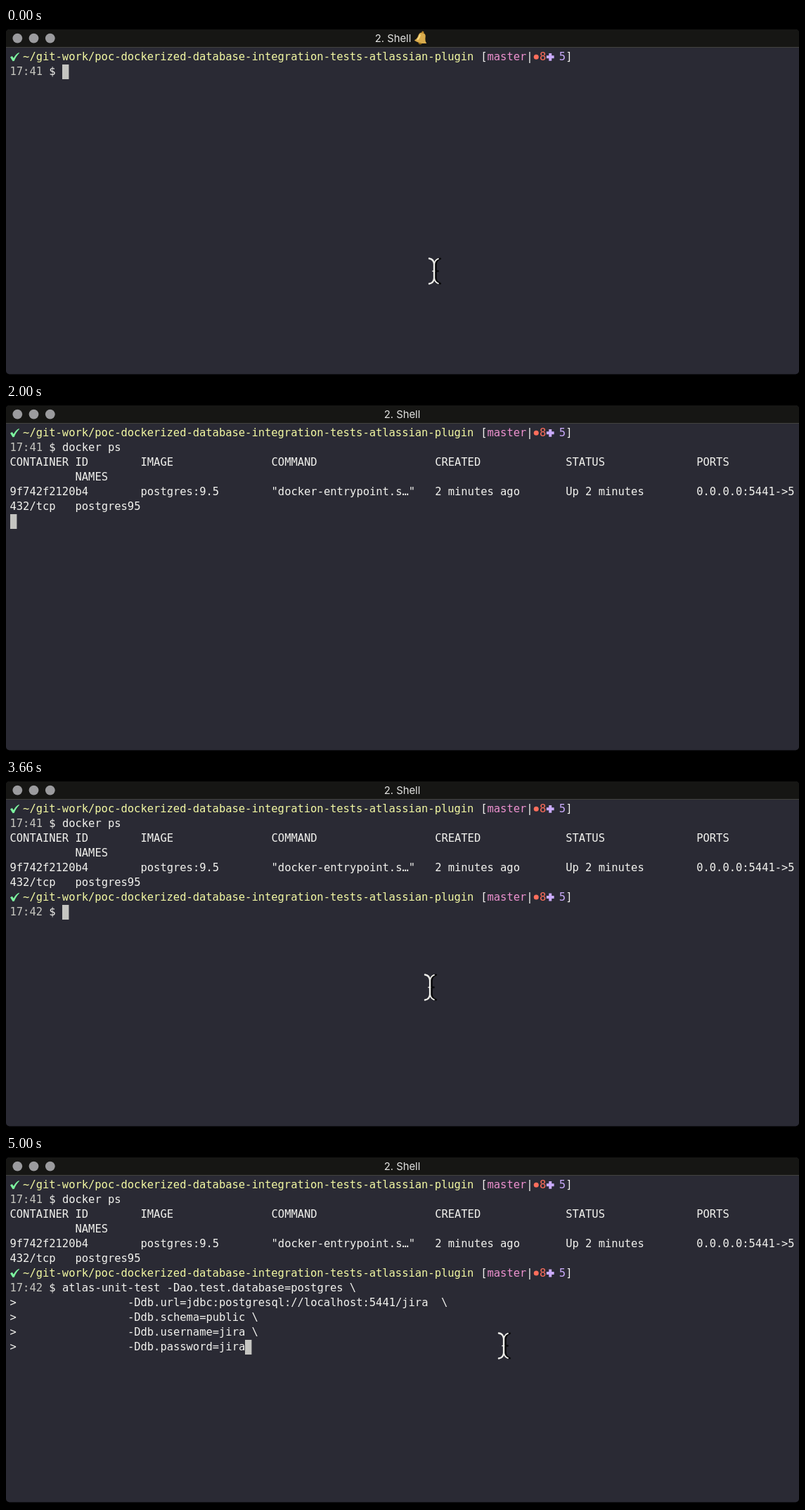
An HTML page that plays this animation: 1128 px wide and 496 px high, repeating every 8 s.

```html
<!DOCTYPE html>
<html lang="en">
<head>
<meta charset="utf-8">
<title>Shell</title>
<style>
  html, body { margin: 0; width: 100%; height: 100%; overflow: hidden; background: #000; }
  svg { display: block; width: 1128px; height: 496px; }
  text { white-space: pre; }
  #screen { font: 15.45px "DejaVu Sans Mono", monospace; fill: #f2f2ee; }
  #title { font: 14.8px Inter, sans-serif; fill: #e4e4e2; }
  .path { fill: #f3f9a3; }
  .branch { fill: #ee92d0; }
  .staged { fill: #ff6e5c; }
  .changed { fill: #c9aafa; }
  .clock { fill: #c6c6c0; }
  .ok { fill: #7df5a0; }
</style>
</head>
<body>
<svg viewBox="0 0 1128 496">
  <rect y="2" width="1128" height="491.5" rx="5" fill="#2a2a34"/>
  <path d="M0 27V7Q0 2 5 2H1123Q1128 2 1128 7V27Z" fill="#161614"/>
  <rect y="27" width="1128" height="1" fill="#43433f"/>
  <g fill="#9b9b9e">
    <circle cx="16.3" cy="14.6" r="6.9"/>
    <circle cx="39.5" cy="14.6" r="6.9"/>
    <circle cx="62.8" cy="14.6" r="6.9"/>
  </g>
  <text id="title" y="20.2" text-anchor="middle">2. Shell</text>
  <g id="bell" transform="translate(591 14) rotate(14)">
    <circle cy="7" r="2.7" fill="#8b6514"/>
    <path d="M-9 6Q-5.5 3 -5.2-2.5Q-4.8-7.4 0-7.6Q4.8-7.4 5.2-2.5Q5.5 3 9 6Q0 9 -9 6Z" fill="#d9ab4c"/>
    <path d="M-3-4Q-3 1-5 4" fill="none" stroke="#f9dc86" stroke-width="2"/>
    <circle cy="-8" r="1.6" fill="#b9852a"/>
  </g>
  <g id="screen"></g>
  <rect id="block" width="9.4" height="21" fill="#c5c5c1"/>
  <g id="mouse" fill="none" stroke-linecap="round">
    <path d="M8.3-17.8Q2.8-16.5 2-10V10Q2.8 16.5 8.3 17.8M1 0H5" stroke="#08080a" stroke-width="2.6"/>
    <path d="M-7.6-18Q-1-17-.5-10V10Q-1 17-7.6 18" stroke="#eeeeea" stroke-width="2.3"/>
    <path d="M5.5-17.6Q.6-16-.3-10V10Q.6 16 5.5 17.6M-2.5 0H0" stroke="#eeeeea" stroke-width="1.7"/>
  </g>
</svg>
<script>
const LOOP = 8000, LEFT = 5.5, CELL = 9.302, TOP = 31.2, PITCH = 20.95;
const $ = id => document.getElementById(id);
const colX = c => LEFT + c * CELL;
const rowY = r => TOP + r * PITCH;

const cell = (c, s, kind = "") =>
  `<text class="${kind}" x="${colX(c)}" y="15">${s.replace(/>/g, "&gt;")}</text>`;

const prompt =
  `<path class="ok" d="M6 10.3L8.8 8.8L10.8 11.8Q13.8 6 18.4 3.8L19 4.6Q14.5 8.7 11.7 15.8L9.5 16Z"/>` +
  cell(2, "~/git-work/poc-dockerized-database-integration-tests-atlassian-plugin", "path") +
  cell(72, "[") + cell(73, "master", "branch") + cell(79, "|") +
  `<circle class="staged" cx="754.2" cy="10" r="3.5"/>` + cell(81, "8", "staged") +
  `<path class="changed" d="M772.2 4.7h4v3.4h3.4v4h-3.4v3.4h-4v-3.4h-3.4v-4h3.4z"/>` +
  cell(84, "5", "changed") + cell(85, "]");

const shell = (clock, command) => cell(0, clock, "clock") + cell(6, "$") + cell(8, command);
const more = s => cell(0, ">") + cell(18, s);
const columns = (...words) => words.map((w, i) => cell([0, 20, 40, 65, 85, 105][i], w)).join("");

// [appears at, row, content]
const lines = [
  [0, 0, prompt],
  [0, 1, shell("17:41", "")],
  [1000, 1, cell(8, "do")],
  [1330, 1, cell(10, "cke")],
  [1660, 1, cell(13, "r ps")],
  [2000, 2, columns("CONTAINER ID", "IMAGE", "COMMAND", "CREATED", "STATUS", "PORTS")],
  [2000, 3, cell(10, "NAMES")],
  [2000, 4, columns("9f742f2120b4", "postgres:9.5", '"docker-entrypoint.s…"',
    "2 minutes ago", "Up 2 minutes", "0.0.0.0:5441->5")],
  [2000, 5, cell(0, "432/tcp") + cell(10, "postgres95")],
  [2330, 6, prompt],
  [2330, 7, shell("17:42", "")],
  [4660, 7, cell(8, "atlas-unit-test -Dao.test.database=postgres \\")],
  [4660, 8, more("-Ddb.url=jdbc:postgresql://localhost:5441/jira  \\")],
  [4660, 9, more("-Ddb.schema=public \\")],
  [4660, 10, more("-Ddb.username=jira \\")],
  [4660, 11, more("-Ddb.password=jira")]
];

// [time, column, row]
const blocks = [
  [0, 8, 1], [1000, 10, 1], [1330, 13, 1], [1660, 17, 1],
  [2000, 0, 6], [2330, 8, 7], [4660, 36, 11]
];

// [time, x, y]; without a place the pointer is hidden
const pointer = [
  [0, 609.5, 346.5], [330, 610.5, 341.5], [1000],
  [2660, 611, 341.5], [3000, 750.5, 362], [3330, 753, 360],
  [3660, 603.5, 295.5], [4000, 443, 261.5], [4330, 441.5, 259],
  [4660, 492.5, 261.5], [5000, 708.5, 270.5]
];

const at = (steps, t) => steps.filter(s => s[0] <= t).pop();
const show = (el, on) => el.setAttribute("visibility", on ? "visible" : "hidden");

$("screen").innerHTML = lines.map(([, row, content]) =>
  `<g transform="translate(0 ${rowY(row)})">${content}</g>`).join("");
const groups = [...$("screen").children];

function draw(t) {
  groups.forEach((g, i) => show(g, lines[i][0] <= t));

  const [, col, row] = at(blocks, t);
  $("block").setAttribute("x", Math.round(colX(col)));
  $("block").setAttribute("y", Math.round(rowY(row)));

  const [, x, y] = at(pointer, t);
  show($("mouse"), x !== undefined);
  if (x !== undefined) $("mouse").setAttribute("transform", `translate(${x} ${y})`);

  const ringing = t < 1000;
  show($("bell"), ringing);
  $("title").setAttribute("x", ringing ? 550.5 : 563.5);
}

const start = performance.now();
function tick() {
  draw((performance.now() - start) % LOOP);
  requestAnimationFrame(tick);
}
tick();
</script>
</body>
</html>
```
